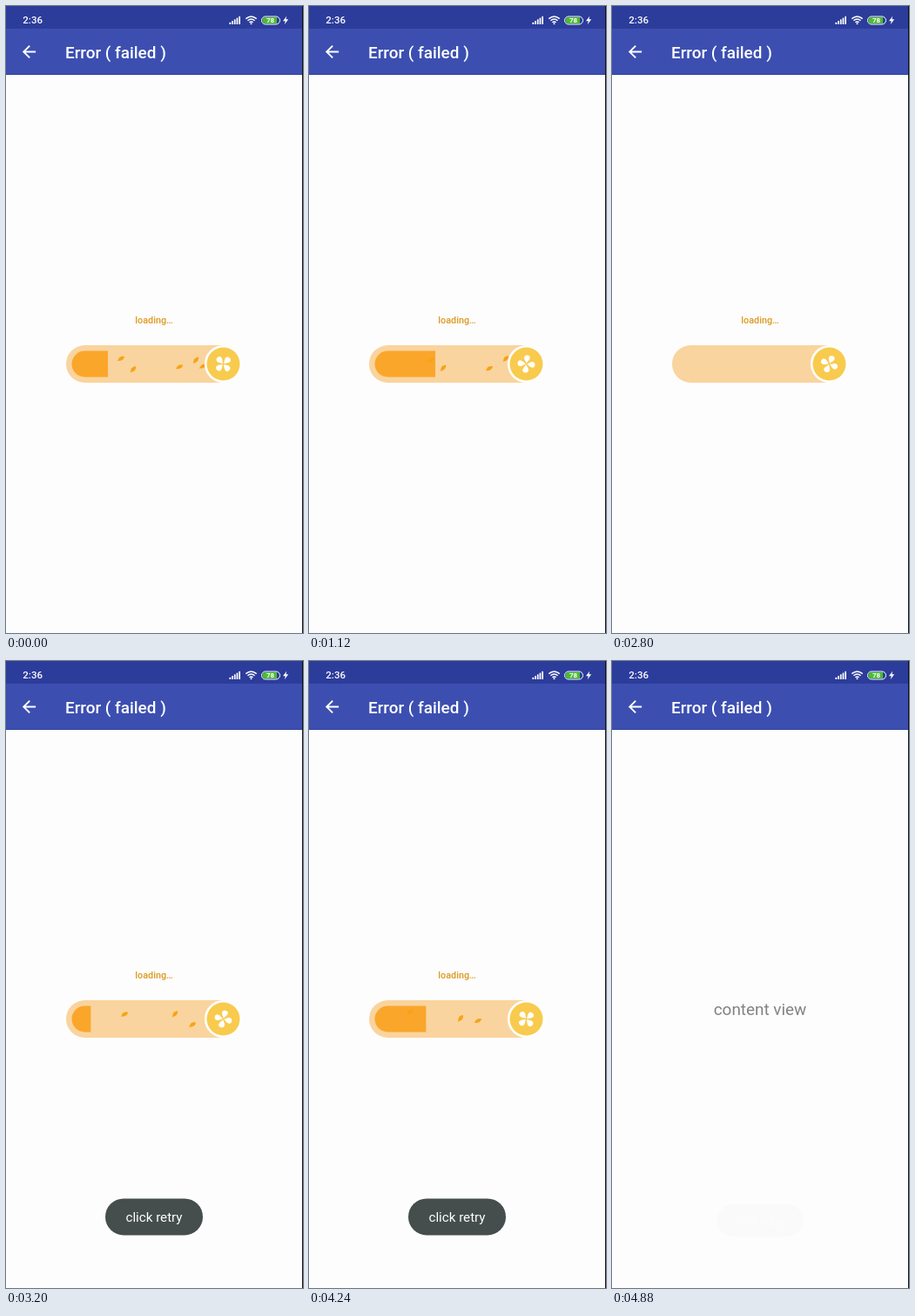
Write an HTML page that moves like this. It is 341 px wide and 719 px high and loops after 6880 ms.

```html
<!DOCTYPE html>
<html lang="en">
<head>
<meta charset="utf-8">
<title>Loading states</title>
<style>
  html, body { margin: 0; width: 100%; height: 100%; overflow: hidden; background: #fdfdfd; }
  svg { display: block; width: 100%; height: 100%; }
  text { font-family: Roboto, sans-serif; }
  .mid { text-anchor: middle; }
  .label { font-size: 18.9px; fill: #828282; }
</style>
</head>
<body>
<svg viewBox="0 0 341 719">
  <defs>
    <clipPath id="track"><rect x="75.5" y="395.5" width="180" height="30" rx="15"/></clipPath>
    <path id="leaf" d="M-5 .5Q-3.2 0 -2.6 -1Q.5 -3.8 4.8 -.6Q1.8 3.2 -2.4 1.6Q-3.4 1.2 -5 .5Z" fill="#f7a315"/>
    <path id="petal" d="M0 -.8C-1.2 -3 -4 -5.2 -3.3 -7.8C-2.6 -10.4 1.6 -10.8 3 -8.6C4.2 -6.2 1.5 -3 0 -.8Z"/>
  </defs>
  <rect width="341" height="719" fill="#fdfdfd"/>
  <rect width="341" height="79" fill="#3c4fb1"/>
  <rect width="341" height="26" fill="#2c3c9a"/>
  <rect y="78" width="341" height="1" fill="#3444a0"/>

  <g fill="#fff">
    <text x="19.3" y="20.2" font-size="11.5" font-weight="500">2:36</text>
    <g id="signal"></g>
    <g fill="none" stroke="#fff" stroke-width="1.4">
      <path d="M275.3 14.6Q281.5 9.2 287.7 14.6M277.4 16.8Q281.5 13.2 285.6 16.8M279.4 18.8Q281.5 17 283.6 18.8"/>
      <rect x="293.5" y="12" width="21" height="9" rx="4.5" stroke-width="1"/>
    </g>
    <circle cx="281.5" cy="20.2" r="1"/>
    <path d="M298 13H311V20H298A3.5 3.5 0 0 1 298 13Z" fill="#4bbd2f"/>
    <text class="mid" x="303.6" y="19.4" font-size="8" font-weight="700">78</text>
    <path d="M322.3 11.5L318 17.2H320.8L319.7 21.3L324.2 15.3H321.4Z"/>
    <path transform="translate(15.1 41.1) scale(.95)" d="M20 11H7.83l5.59-5.59L12 4l-8 8 8 8 1.41-1.41L7.83 13H20z"/>
    <text x="68" y="60" font-size="18.9" font-weight="500">Error ( failed )</text>
  </g>

  <g id="loading">
    <text class="mid" x="170" y="364.4" font-size="10.8" font-weight="500" fill="#dd9a22">loading…</text>
    <path d="M249.5 389H90.5a21.5 21.5 0 0 0 0 43H249.5Z" fill="#fad49e"/>
    <g clip-path="url(#track)"><rect id="fill" x="75" y="395" height="31" fill="#faa62b"/></g>
    <g id="leaves"></g>
    <circle cx="249.5" cy="410.5" r="21.6" fill="#fff"/>
    <circle cx="249.5" cy="410.5" r="19" fill="#f8cb4e"/>
    <g id="fan" fill="#fff"></g>
  </g>

  <g id="error">
    <circle cx="170" cy="378.5" r="23.8" fill="#868884"/>
    <path d="M167 367.5Q167 365 170 365T173 367.5L172 381.5Q171.8 383.8 170 383.8T168 381.5Z" fill="#fff"/>
    <circle cx="170" cy="389" r="2.8" fill="#fff"/>
    <text class="mid label" x="170" y="438.6">error click retry</text>
  </g>

  <text id="content" class="mid label" x="170" y="405.5">content view</text>

  <g id="toast">
    <rect x="-56" y="-21" width="112" height="42" rx="21" fill="#454e4d"/>
    <text class="mid" y="6" font-size="15.15" fill="#fff">click retry</text>
  </g>
  <rect x="340" width="1" height="719" fill="#111"/>
</svg>
<script>
const LOOP = 6880, STEP = 80;
const FAIL = 1920, RETRY = 2800, DONE = 4880;
const MID_Y = 410.5, START_X = 236, END_X = 78;
const LEAF_SPEED = 0.25, FAN_SPEED = 0.205;

// lead: time already spent loading; births: when each leaf first leaves the fan
const runs = [
  { start: 0, lead: 1175, gain: 0.191, fan: 48, period: 1152, births: [-416, -360, -148, -72, -40] },
  { start: RETRY, lead: 0, gain: 0.231, fan: 24, period: 960, births: [0, 232, 312] }
];

const $ = id => document.getElementById(id);
const add = (parent, name, attrs) => {
  const el = document.createElementNS('http://www.w3.org/2000/svg', name);
  for (const key in attrs) el.setAttribute(key, attrs[key]);
  return parent.appendChild(el);
};
const show = (el, on) => { el.style.display = on ? '' : 'none'; };
const smooth = x => {
  const k = Math.min(1, Math.max(0, x));
  return k * k * (3 - 2 * k);
};

for (let i = 0; i < 5; i++) {
  const h = 2.2 + i * 1.75;
  add($('signal'), 'rect', { x: 256.5 + i * 2.7, y: 21 - h, width: 1.7, height: h, rx: .5 });
}
for (let i = 0; i < 4; i++) add($('fan'), 'use', { href: '#petal', transform: `rotate(${i * 90})` });
const leafEls = runs[0].births.map(() => add($('leaves'), 'use', { href: '#leaf' }));

function drawLeaf(el, i, run, age) {
  const flown = age - run.births[i];
  const x = START_X - LEAF_SPEED * (flown % run.period);
  const visible = flown >= 0 && x >= END_X;
  show(el, visible);
  if (!visible) return;
  const phase = x * 0.035 + i * 2.62 + 0.8;
  const y = MID_Y + 8 * Math.sin(phase);
  el.setAttribute('transform', `translate(${x} ${y}) rotate(${-32 + 12 * Math.cos(phase)})`);
}

function drawLoading(run, age) {
  $('fill').setAttribute('width', run.gain * (age + run.lead) ** 0.763);
  $('fan').setAttribute('transform', `translate(249.5 410.5) rotate(${run.fan + FAN_SPEED * age})`);
  leafEls.forEach((el, i) => drawLeaf(el, i, run, age));
}

function drawToast(t) {
  const rise = smooth((t - RETRY) / 320);
  const fall = smooth((DONE + 20 - t) / 300);
  const k = rise * fall;
  const y = 637.4 + 15 * (1 - rise) + 4 * (1 - fall);
  $('toast').setAttribute('opacity', k);
  $('toast').setAttribute('transform', `translate(170 ${y}) scale(${.88 + .12 * k})`);
}

function draw(t) {
  const run = runs[t < RETRY ? 0 : 1];
  const loading = t < FAIL || (t >= RETRY && t < DONE);
  show($('loading'), loading);
  show($('error'), t >= FAIL && t < RETRY);
  show($('content'), t >= DONE);
  if (loading) drawLoading(run, t - run.start);
  drawToast(t);
}

const begin = performance.now();
function tick() {
  const t = (performance.now() - begin) % LOOP;
  draw(Math.floor(t / STEP) * STEP);
  requestAnimationFrame(tick);
}
tick();
</script>
</body>
</html>
```
